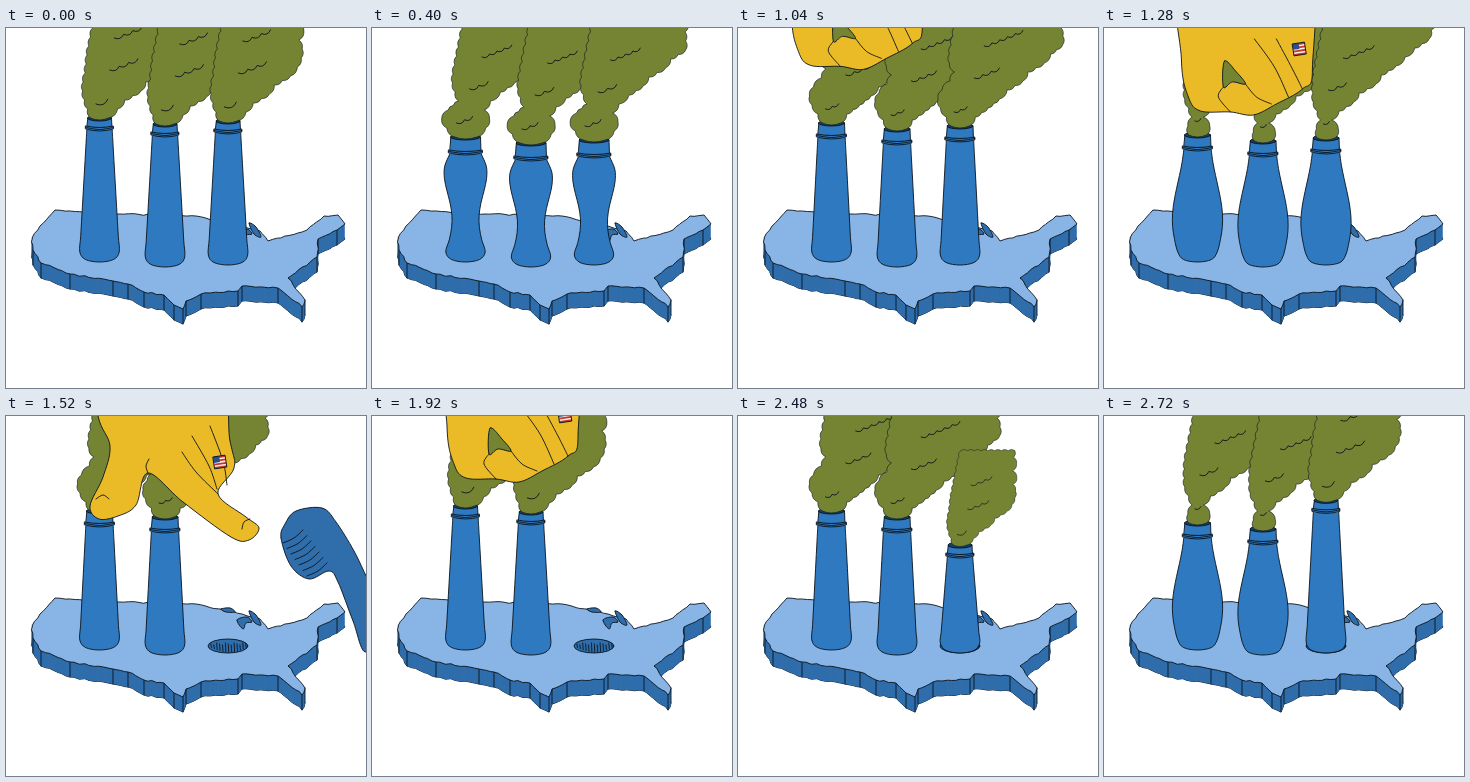
These frames come from a looping animation (360x360 px, 2800 ms). An HTML page with a canvas:

```html
<!DOCTYPE html>
<html lang="en">
<head>
<meta charset="utf-8">
<title>Smokestacks</title>
<style>
html, body { margin: 0; width: 100%; height: 100%; overflow: hidden; background: #fff; }
canvas { display: block; }
</style>
</head>
<body>
<canvas id="stage" width="360" height="360"></canvas>
<script>
const ctx = document.getElementById('stage').getContext('2d');
const STEP = 80, STEPS = 35, FLICK = 18, REGROW = 29, DEPTH = 15;
const INK = '#0b141c', BLUE = '#2e79c0', DARK = '#2f6dab', LIGHT = '#88b5e5',
      OLIVE = '#758433', YELLOW = '#eabb27';

const bell = (x, mid, width) => Math.exp(-(((x - mid) / width) ** 2));
const lerp = (a, b, k) => a + (b - a) * k;

let seed = 7;
const random = () => (seed = seed * 16807 % 2147483647) / 2147483647;

// Puffing cycle of six steps; steps 2 and 3 are blends of 1 and 4.
const SHAPE = { // top, mouth, rim offset, belly, ripple
  0: [90, 12, 8, 0, 0],
  1: [95, 13, 11, 0, 0],
  4: [107, 13, 11, 7.5, 0],
  5: [109, 15, 13, 0, 5]
};
const SMOKE = { // neck height, puff, lean start, reach
  0: [140, 4, -5, 73],
  1: [52, 9, -5, 102],
  4: [20, 0, 15, 108],
  5: [36, 11, 15, 92]
};
function pose(keys, p) {
  return keys[p] || keys[1].map((v, i) => lerp(v, keys[4][i], (p - 1) / 3));
}

const STACKS = [{ x: 93.5, drop: 0, foot: 234 }, { x: 159, drop: 6, foot: 239 }, { x: 222, drop: 3, foot: 237 }];

const BACK = [26,210, 34,198, 49,182, 113,186, 190,188, 236,198, 254,203, 262,213, 301,202, 318,188, 332,187, 339,196];
const FRONT = [331,202, 312,211, 311,229, 282,250, 299,272, 296,279, 272,260, 236,258, 232,263, 195,266, 180,273,
  177,281, 168,277, 158,267, 138,264, 122,256, 107,253, 64,246, 35,235, 27,222];
const LAND = coastline([...BACK, ...FRONT]);

// roughens the straight pieces between the points
function coastline(p) {
  const out = [];
  for (let i = 0; i < p.length; i += 2) {
    const [x, y] = [p[i], p[i + 1]];
    const [dx, dy] = [p[(i + 2) % p.length] - x, p[(i + 3) % p.length] - y];
    const n = Math.ceil(Math.hypot(dx, dy) / 5);
    for (let k = 0; k < n; k++) {
      const rough = k ? 1.6 : 0;
      out.push(x + dx * k / n + (random() - 0.5) * rough, y + dy * k / n + (random() - 0.5) * rough);
    }
  }
  return out;
}

function paint(fill, stroke = INK, width = 0.9) {
  if (fill) { ctx.fillStyle = fill; ctx.fill(); }
  if (stroke) { ctx.strokeStyle = stroke; ctx.lineWidth = width; ctx.stroke(); }
}
function polygon(p, dy = 0) {
  ctx.beginPath();
  for (let i = 0; i < p.length; i += 2) ctx.lineTo(p[i], p[i + 1] + dy);
  ctx.closePath();
}
// smooth curve through the points
function spline(p, closed = true) {
  const n = p.length / 2;
  const at = i => {
    i = closed ? (i + n) % n : Math.max(0, Math.min(n - 1, i));
    return [p[2 * i], p[2 * i + 1]];
  };
  ctx.beginPath();
  ctx.moveTo(...at(0));
  for (let i = 0; i < (closed ? n : n - 1); i++) {
    const [a, b, c, d] = [at(i - 1), at(i), at(i + 1), at(i + 2)];
    ctx.bezierCurveTo(b[0] + (c[0] - a[0]) / 6, b[1] + (c[1] - a[1]) / 6,
      c[0] - (d[0] - b[0]) / 6, c[1] - (d[1] - b[1]) / 6, c[0], c[1]);
  }
}
function lines(...list) {
  for (const p of list) { spline(p, false); paint(null); }
}
function shifted(x, y, draw) {
  ctx.save();
  ctx.translate(x, y);
  draw();
  ctx.restore();
}
// row of small bumps, bulging to the left of the direction of travel
function scallop(x0, y0, x1, y1, bulge) {
  const dx = x1 - x0, dy = y1 - y0;
  const n = Math.max(1, Math.round(Math.hypot(dx, dy) / 9));
  for (let i = 0; i < n; i++) {
    const m = (i + 0.5) / n, e = (i + 1) / n;
    ctx.quadraticCurveTo(x0 + dx * m + dy / n * bulge, y0 + dy * m - dx / n * bulge, x0 + dx * e, y0 + dy * e);
  }
}

function map() {
  polygon(LAND, DEPTH);
  paint(DARK);
  for (let dy = DEPTH; dy > 0; dy--) { polygon(LAND, dy); paint(DARK, null); }
  for (let i = 0; i < FRONT.length; i += 2) lines([FRONT[i], FRONT[i + 1], FRONT[i], FRONT[i + 1] + DEPTH]);
  polygon(LAND);
  paint(LIGHT);
  // lakes
  for (const lake of [
    [215,193, 224,192, 229,196, 220,196],
    [231,204, 241,201, 246,206, 240,207, 237,213],
    [243,195, 250,199, 255,209, 248,206]
  ]) { spline(lake); paint(DARK); }
}

function hole() {
  ctx.beginPath();
  ctx.ellipse(222, 230, 20, 7, 0, 0, 7);
  paint(DARK);
  for (let i = 1; i < 14; i++) {
    const x = 202 + i * 2.9;
    lines([x, 227 + i % 3, x + 0.5, 230 + 6 * Math.sin(i / 14 * Math.PI)]);
  }
}

function stack({ x, drop, foot }, phase, grow = 1) {
  const [height, mouth, off, belly, ripple] = pose(SHAPE, phase);
  const top = foot - (foot - height - drop) * grow;
  const band = top + off, rim = mouth + 1.8, left = [], right = [];
  for (let t = 0; t <= 1; t += 0.125) {
    const w = lerp(mouth + 0.7, 19.7, t) + belly * Math.sin(Math.PI * t ** 1.5)
      + ripple * Math.sin(2 * Math.PI * t ** 0.8);
    const y = lerp(band + 4, Math.max(band + 4, foot - 10), t);
    left.push(x - w, y);
    right.unshift(x + w, y);
  }
  spline([...left, x - 14, foot - 2.5, x, foot, x + 14, foot - 2.5, ...right], false);
  paint(BLUE);
  polygon([x - mouth, top, x + mouth, top, x + mouth + 0.5, band + 2, x - mouth - 0.5, band + 2]);
  paint(BLUE);
  ctx.beginPath();
  ctx.ellipse(x, top, mouth, 3, 0, 0, 7);
  paint('#173f68');

  ctx.beginPath();
  ctx.moveTo(x - rim, band);
  ctx.quadraticCurveTo(x, band + 3, x + rim, band);
  ctx.lineTo(x + rim, band + 3);
  ctx.quadraticCurveTo(x, band + 7, x - rim, band + 3);
  ctx.closePath();
  paint(BLUE);
  lines([x - rim, band + 1.5, x, band + 3.5, x + rim, band + 1.5]);
  return top;
}

function plume(x, y, phase, scale = 1) {
  const [neck, puff, lean, reach] = pose(SMOKE, phase);
  const swell = h => puff * bell(h, Math.min(neck / 2, 30), 14);
  const leftAt = h => -9 - 4 * Math.min(1, h / 15) - swell(h) + 8 * bell(h, neck, 9) + Math.max(0, h - 60) * 0.2;
  const rightAt = h => Math.max(
    h < neck ? 9 + 4 * Math.min(1, h / 8) * (1 - 2 * bell(h, neck, 7)) + swell(h) : 6,
    Math.min(reach, 1.2 * (h - lean)) + 3 * Math.sin(h * 0.3 + phase));
  const points = [];
  for (let h = 0; h <= 126; h += 9) {
    points.push([leftAt(h), -h]);
    points.unshift([rightAt(h), -h]);
  }
  points.reverse();
  // start from the mouth on the left
  const outline = [...points.slice(0, 15).reverse(), ...points.slice(15).reverse()].reverse();
  shifted(x, y, () => {
    ctx.scale(scale, scale);
    ctx.beginPath();
    let [px, py] = [leftAt(0), 0];
    ctx.moveTo(px, py);
    const visit = (nx, ny) => { scallop(px, py, nx, ny, 0.35); [px, py] = [nx, ny]; };
    for (let h = 9; h <= 126; h += 9) visit(leftAt(h), -h);
    for (let h = 126; h >= 0; h -= 9) visit(rightAt(h), -h);
    ctx.quadraticCurveTo(0, 4, leftAt(0), 0);
    paint(OLIVE, INK, 0.6);
    for (const h of [14, 48, 80]) {
      const l = leftAt(h), r = rightAt(h);
      const [x0, x1] = [lerp(l, r, 0.3), lerp(l, r, 0.65)];
      ctx.beginPath();
      ctx.moveTo(x0, -h);
      scallop(x0, -h, x1, -h - (x1 - x0) * 0.4, -0.5);
      paint(null);
    }
  });
}

function ring(x, y) {
  shifted(x, y, () => {
    ctx.rotate(-0.15);
    ctx.fillStyle = '#f4efe6';
    ctx.fillRect(-6, -6, 12, 12);
    ctx.fillStyle = '#c9372c';
    for (let i = 0; i < 4; i++) ctx.fillRect(-6, -6 + i * 3.4, 12, 1.8);
    ctx.fillStyle = '#2a4f8f';
    ctx.fillRect(-6, -6, 6, 6);
    ctx.beginPath();
    ctx.rect(-6, -6, 12, 12);
    paint(null);
  });
}

function fist() {
  spline([78,-90, 75,10, 82,48, 94,62, 124,63, 147,66, 170,55, 196,40, 206,20, 196,-90]);
  paint(YELLOW);
  spline([118,12, 130,23, 139,35, 126,33, 117,38]);
  paint(OLIVE);
  lines([117,38, 112,48, 124,63], [139,35, 150,48, 165,55], [148,-10, 168,18, 182,48], [170,-10, 186,20, 196,40]);
  ring(193, 0);
}

function openHand() {
  spline([85,-60, 92,0, 104,30, 97,61, 84,90, 93,103, 112,100, 130,89, 142,57, 177,86, 225,121, 243,124, 253,112,
    240,101, 212,78, 228,52, 224,25, 205,-60]);
  paint(YELLOW);
  lines([142,57, 140,50, 143,43], [212,78, 190,56, 176,36], [186,20, 203,50, 211,73], [204,10, 217,45, 221,69],
    [90,83, 97,79, 103,83], [236,113, 238,106, 244,103]);
  ring(214, 46);
}

function tornStack() {
  spline([275,122, 279,108, 290,95, 316,92, 330,106, 348,135, 362,164, 380,200, 360,236, 347,205, 332,166,
    323,155, 303,163, 285,150]);
  paint(DARK);
  for (let i = 0; i < 7; i++) {
    const x = 277 + i * 4, y = 127 + i * 5.5;
    lines([x, y, x + 11, y - 5, x + 20, y - 13]);
  }
}

function hand(n) {
  if (n >= 12 && n < FLICK) {
    const k = ((17 - n) / 5) ** 2;
    shifted(4 - 40 * k, 24 - 76 * k, fist);
  } else if (n >= FLICK && n < 22) {
    shifted(0, 3 * (19 - n), openHand);
  } else if (n >= 22 && n < 28) {
    shifted(0, 12 - 3 * (n - 22) ** 2, fist);
  }
}

function draw(n) {
  const phase = n % 6, third = STACKS[2];
  ctx.fillStyle = '#fff';
  ctx.fillRect(0, 0, 360, 360);
  ctx.lineJoin = ctx.lineCap = 'round';
  map();
  if (n >= FLICK) hole();

  const standing = n < FLICK ? STACKS : STACKS.slice(0, 2);
  const plumes = standing.map(s => [s.x, stack(s, phase), phase]);
  if (n >= REGROW) {
    const grow = 1.06 * Math.sin((n - 28) / 6 * Math.PI / 2);
    plumes.push([third.x, stack(third, 0, grow), 0, Math.min(1, grow)]);
  }
  plumes.forEach(p => plume(...p));

  if (n === FLICK) {
    shifted(262, 205, () => {
      ctx.rotate(0.6);
      ctx.translate(-third.x, -third.foot);
      stack(third, 0);
    });
  }
  if (n === FLICK + 1 || n === FLICK + 2) shifted(48 * (n - FLICK - 1), 0, tornStack);
  hand(n);
}

const start = performance.now();
function tick() {
  draw(Math.floor((performance.now() - start) / STEP) % STEPS);
  requestAnimationFrame(tick);
}
tick();
</script>
</body>
</html>
```
